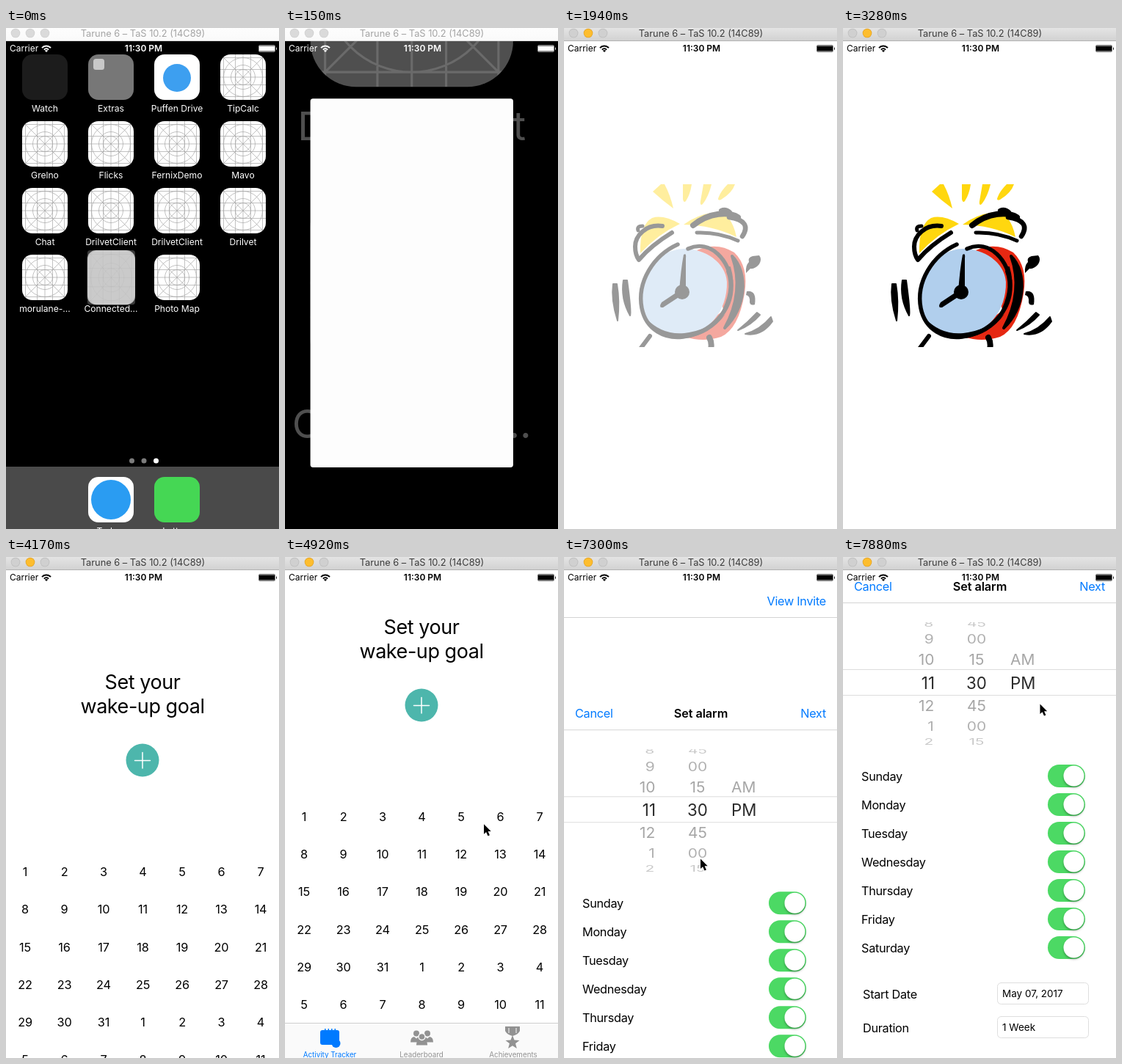
Animation, 372 px wide and 683 px high, one loop 8 s. Source, as an HTML page with a canvas:

```html
<!DOCTYPE html>
<html lang="en">
<head>
<meta charset="utf-8">
<title>Alarm app walkthrough</title>
<style>
  html, body { margin: 0; width: 100%; height: 100%; overflow: hidden; background: #fff; }
  canvas { display: block; width: 372px; height: 683px; }
</style>
</head>
<body>
<canvas id="stage"></canvas>
<script>
const W = 372, H = 683, LOOP = 8000, TOP = 18, TRAVEL = 667;
const BLUE = '#007aff', TEAL = '#4db6ac', GREY = '#929292';
const ratio = Math.max(1, window.devicePixelRatio || 1);

function prepare(canvas) {
  canvas.width = W * ratio;
  canvas.height = H * ratio;
  const c = canvas.getContext('2d');
  c.scale(ratio, ratio);
  return c;
}
let g = prepare(document.getElementById('stage'));

// The picture only changes at these moments and holds in between.
const run = (a, b, n) => Array.from({ length: n }, (_, i) => a + (b - a) * i / (n - 1));
const STEPS = [0, ...run(150, 450, 3), ...run(1940, 2230, 3), ...run(4020, 4470, 4),
  ...run(4770, 5660, 7), 5960, ...run(6260, 7300, 8), ...run(7440, 7880, 4)];
const hold = t => STEPS.filter(s => s <= t + 0.01).pop();

const clamp = v => Math.min(1, Math.max(0, v));
const lerp = (a, b, p) => a + (b - a) * p;
const ramp = (t, a, b) => clamp((t - a) / (b - a));
const ease = p => p * p * (3 - 2 * p);
// Critically damped spring: distance still to go, 1 to 0.
function remaining(t, start) {
  const x = 0.015 * Math.max(0, t - start);
  return x > 7.5 ? 0 : (1 + x) * Math.exp(-x);
}

// ---------- drawing helpers ----------
function box(x, y, w, h, fill) { g.fillStyle = fill; g.fillRect(x, y, w, h); }

function round(x, y, w, h, r, fill, line) {
  g.beginPath();
  g.roundRect(x, y, w, h, r);
  if (fill) { g.fillStyle = fill; g.fill(); }
  if (line) { g.strokeStyle = line; g.lineWidth = 1; g.stroke(); }
}

function disc(x, y, r, fill) {
  g.beginPath();
  g.arc(x, y, r, 0, Math.PI * 2);
  g.fillStyle = fill;
  g.fill();
}

// y is the middle of the capital letters
function text(s, x, y, size, { color = '#000', align = 'center', weight = 400, track = 0 } = {}) {
  g.font = `${weight} ${size}px Inter, "Open Sans", sans-serif`;
  g.letterSpacing = track + 'px';
  g.textAlign = align;
  g.textBaseline = 'alphabetic';
  g.fillStyle = color;
  g.fillText(s, x, y + size * 0.36);
}
const body = (s, x, y, opt) => text(s, x, y, 16.3, { track: -0.3, align: 'left', ...opt });
const headline = (s, y) => text(s, 186, y, 27, { track: -0.45 });

function path(d, fill, line, width) {
  const p = new Path2D(d);
  if (fill) { g.fillStyle = fill; g.fill(p); }
  if (line) {
    g.strokeStyle = line;
    g.lineWidth = width;
    g.lineCap = g.lineJoin = 'round';
    g.stroke(p);
  }
}

// ---------- window frame ----------
function titleBar(active) {
  const shade = g.createLinearGradient(0, 0, 0, 17);
  shade.addColorStop(0, active ? '#e4e4e4' : '#fdfdfd');
  shade.addColorStop(1, active ? '#d2d2d2' : '#fafafa');
  box(0, 0, W, 17, shade);
  box(0, 17, W, 1, active ? '#b2b2b2' : '#d6d6d6');
  [13, 33, 53].forEach((x, i) => {
    const lit = active && i === 1;
    disc(x, 7, 6.3, lit ? '#e0a229' : active ? '#bcbcbc' : '#cfcfcf');
    disc(x, 7, 5.6, lit ? '#fdbd2e' : active ? '#d0d0d0' : '#dadada');
  });
  text('Tarune 6 – TaS 10.2 (14C89)', 186.5, 7, 12.8, { color: active ? '#3c3c3c' : '#a4a4a4' });
}

function statusBar(color) {
  text('Carrier', 5, 28, 12, { color, align: 'left' });
  text('11:30 PM', 187.5, 28, 12, { color, weight: 600 });
  g.strokeStyle = color;
  g.lineCap = 'butt';
  [4.2, 8].forEach(r => {
    g.lineWidth = 1.9;
    g.beginPath();
    g.arc(55, 32.5, r, -Math.PI * 0.77, -Math.PI * 0.23);
    g.stroke();
  });
  path('M55 33L52.8 30.7Q55 29.2 57.2 30.7Z', color);
  g.save();
  g.globalAlpha *= 0.55;
  round(344.5, 23.5, 22, 9, 1.5, null, color);
  g.restore();
  box(345, 24.5, 21, 7, color);
  path('M368 26Q370 28 368 30.5Z', color);
}

// ---------- home screen ----------
const ICON = 62;
const APPS = ['Watch', 'Extras', 'Puffen Drive', 'TipCalc', 'Grelno', 'Flicks', 'FernixDemo', 'Mavo',
  'Chat', 'DrilvetClient', 'DrilvetClient', 'Drilvet', 'morulane-…', 'Connected…', 'Photo Map'];

function blankIcon(x, y) {
  const c = ICON / 2;
  g.save();
  g.translate(x, y);
  round(0, 0, ICON, ICON, 14, '#fff');
  g.clip();
  g.strokeStyle = '#a6a6a6';
  g.lineWidth = 0.7;
  g.beginPath();
  for (const d of [-26.5, -10.5, 0, 10.5, 26.5]) {
    g.moveTo(c + d, 0); g.lineTo(c + d, ICON);
    g.moveTo(0, c + d); g.lineTo(ICON, c + d);
  }
  g.moveTo(0, 0); g.lineTo(ICON, ICON);
  g.moveTo(ICON, 0); g.lineTo(0, ICON);
  for (const r of [10.5, 16.5, 26.5]) {
    g.moveTo(c + r, c);
    g.arc(c, c, r, 0, Math.PI * 2);
  }
  g.stroke();
  g.restore();
}

function home() {
  APPS.forEach((name, i) => {
    const x = 22 + 90 * (i % 4), y = 36 + 91 * Math.floor(i / 4);
    if (i === 0) round(x, y, ICON, ICON, 14, '#1c1c1c');
    else if (i === 1) {
      round(x, y, ICON, ICON, 14, '#777');
      round(x + 7, y + 6, 15, 15, 3.5, '#c8c8c8');
    } else if (i === 2) {
      round(x, y, ICON, ICON, 14, '#fff');
      disc(x + 31, y + 32, 19, '#3d9ff0');
    } else blankIcon(x, y);
    text(name, x + 31, y + 74, 12.1, { color: '#fff' });
  });
  [171.5, 188, 204.5].forEach((x, i) => disc(x, 590, 3.5, i < 2 ? '#7c7c7c' : '#fff'));
  box(0, 598, W, 90, '#4a4a4a');
  round(112, 612, ICON, ICON, 14, '#fff');
  disc(143, 643, 27, '#2a9cf2');
  round(202, 612, ICON, ICON, 14, '#45d754');
  text('Treken', 143, 686, 12.1, { color: '#fff' });
  text('Letters', 233, 686, 12.1, { color: '#fff' });
}

// The tapped icon grows into the empty first screen, a little faster in height.
function launch(t) {
  const p = 1 - remaining(t, -10), q = p ** 0.85;
  const x = lerp(112, 0, p), w = lerp(ICON, W, p);
  const y = lerp(309, TOP, q), h = lerp(ICON, H - TOP, q);
  box(0, TOP, W, H, '#000');
  g.save();
  if (t > 0) {
    g.globalAlpha = 1 - p;
    g.translate(x + w / 2, y + h / 2);
    g.scale(w / ICON, w / ICON);
    g.translate(-143, -340);
  }
  home();
  g.restore();
  statusBar('#fff');
  const tone = Math.round(lerp(188, 255, clamp(p * 1.4)));
  if (t === 0) round(x, y, w, h, 4, '#3a3a3a');
  round(x, y, w, h, lerp(12, 0, p), `rgb(${tone},${tone},${tone})`);
  g.save();
  g.globalAlpha = 0.2 * clamp(1 - 2 * p);
  g.translate(x, y);
  g.scale(w / ICON, h / ICON);
  blankIcon(0, 0);
  g.restore();
}

// ---------- splash illustration ----------
function paintClock() {
  const ink = '#000', sun = '#ffd70f';
  g.beginPath();
  g.rect(0, 213, W, 222);
  g.clip();
  // rays
  path('M121 223L132 213H137Q145 228 149 246Q134 235 121 223Z', sun);
  path('M162 213H174Q172 227 166 236Q163 239 162 233Z', sun);
  path('M190 213H201Q197 230 189 240Q185 243 186 236Z', sun);
  path('M223 213H233Q229 225 214 234Q208 236 211 230Q214 222 223 213Z', sun);
  // bells
  path('M104 307Q103 268 120 259Q135 254 158 267Q128 281 104 307Z', sun);
  path('M163 268Q180 255 205 251Q228 250 235 285Q203 269 163 268Z', sun);
  // body
  path('M181 303Q208 291 232 306Q252 325 246 362Q238 410 214 421Q189 429 165 421L218 385Z', '#e62812');
  path('M162 301C190 300 220 318 222 346C223 386 196 418 160 420C126 423 104 396 106 362C108 326 132 303 162 301Z', '#b1cfed');
  path('M155 295C122 310 99 346 106 382C112 412 138 424 162 421C200 416 229 386 228 350C227 318 200 287 169 301', null, ink, 5.5);
  path('M112 396Q132 426 165 423Q199 419 220 390Q200 411 164 416Q134 419 112 396Z', ink);
  path('M222 332Q232 358 213 392Q237 362 226 326Z', ink, ink, 2);
  path('M229 311C252 334 248 382 219 409C238 374 240 342 229 311Z', ink, ink, 4);
  // bell outlines
  path('M134 270C112 267 97 283 97 298Q97 309 102 316Q119 296 147 279', null, ink, 6);
  path('M101 276Q99 270 107 270', null, ink, 5);
  path('M176 269C198 251 225 250 237 258', null, ink, 8);
  path('M225 258Q257 263 243 284', null, ink, 6.5);
  path('M214 249Q220 246 226 251', null, ink, 6);
  path('M181 279Q211 278 237 290', null, ink, 5);
  // hands
  path('M157 360Q159 330 163 309Q167 306 166 314L166 360Z', ink);
  path('M161 364L135 381Q128 382 133 374L157 358Z', ink);
  disc(161, 360, 10, ink);
  // winding key, feet and shake marks
  path('M248 334Q247 324 252 319Q250 313 257 311L266 310Q270 315 266 322Q260 329 254 328Z', ink);
  path('M249 359Q263 357 260 377Q254 379 253 374Q254 365 248 364Z', ink);
  path('M117 420L105 436', null, ink, 6);
  path('M198 422Q202 429 200 438', null, ink, 8);
  path('M67 349Q64 371 73 399Q76 372 72 349Z', ink, ink, 2);
  path('M81 344Q77 369 90 392Q92 388 86 344Z', ink, ink, 2);
  path('M263 388Q251 401 237 412Q255 405 267 391Z', ink, ink, 2);
  path('M282 394Q267 412 247 417Q269 421 284 400Z', ink, ink, 2);
}

const clockArt = document.createElement('canvas');
const screen = g;
g = prepare(clockArt);
paintClock();
g = screen;

function splash(t) {
  g.globalAlpha = lerp(0.4, 1, ramp(t, 1940, 2230));
  g.drawImage(clockArt, 0, 0, W, H);
  g.globalAlpha = 1;
}

// ---------- app screens ----------
function plusButton(y) {
  disc(186, y, 22.5, TEAL);
  path(`M175.5 ${y + 0.5}H196.5M186 ${y - 10.5}V${y + 11}`, null, '#fff', 1.5);
}

function person(x, y, s, color) {
  g.save();
  g.translate(x, y);
  g.scale(s, s);
  disc(0, 0, 4, color);
  path('M-8 12Q-8 5 -3 4.5L0 7L3 4.5Q8 5 8 12Z', color);
  g.restore();
}

function people(color) {
  person(179, 649.5, 1, color);
  person(194, 649.5, 1, color);
  disc(186.5, 654, 5.2, '#fafafa');
  person(186.5, 654, 0.95, color);
}

function tabBar(selected) {
  const tint = i => i === selected ? BLUE : GREY;
  box(0, 635, W, 60, '#fafafa');
  box(0, 635, W, 1, '#cfcfcf');
  round(48, 645, 26, 20, 3, tint(0));
  [54, 58.5, 63, 67.5].forEach(x => box(x, 643, 1.5, 3, tint(0)));
  disc(69.5, 663, 6, tint(0));
  people(tint(1));
  path('M300 640H320V646Q318 651 310 653Q302 651 300 646Z', tint(2));
  box(304.5, 642, 1, 7, '#fafafa');
  box(314.5, 642, 1, 7, '#fafafa');
  g.beginPath();
  for (let i = 0; i < 10; i++) {
    const a = i * Math.PI / 5 - Math.PI / 2, r = i % 2 ? 4.3 : 10;
    g.lineTo(310 + r * Math.cos(a), 662 + r * Math.sin(a));
  }
  g.fillStyle = tint(2);
  g.fill();
  ['Activity Tracker', 'Leaderboard', 'Achievements'].forEach((s, i) =>
    text(s, 61 + 125 * i, 678, 9.8, { color: tint(i) }));
}

function tracker(dy) {
  g.save();
  g.translate(0, dy);
  box(0, TOP, W, H, '#fff');
  headline('Set your', 95);
  headline('wake-up goal', 128);
  plusButton(202);
  for (let i = 0; i < 42; i++)
    text(String(i % 31 + 1), 26 + 53.5 * (i % 7), 354 + 51.3 * Math.floor(i / 7), 16.3, { track: -0.2 });
  tabBar(0);
  g.restore();
}

function leaderboard() {
  box(0, TOP, W, H, '#fff');
  body('View Invite', 357, 60, { color: BLUE, align: 'right' });
  box(0, 82, W, 1, '#d4d4d4');
  headline('Start a challenge &', 233);
  headline('invite friends', 266);
  plusButton(407);
  tabBar(1);
}

// Values wrapped around a drum, seen from the front.
function wheel(values, first, x, align) {
  const fades = ['#2b2b2b', '#a6a6a6', '#b0b0b0', '#c9c9c9', '#e6e6e6'];
  values.forEach((s, i) => {
    const k = first + i, a = k * 19 * Math.PI / 180;
    g.save();
    g.translate(x - (align === 'right' ? Math.abs(k) * 0.6 : 0), 171.5 + 96 * Math.sin(a));
    g.scale(k ? 0.94 : 1, Math.cos(a) * (k ? 0.95 : 1));
    text(s, 0, 0, 22.3, { color: fades[Math.abs(k)], align });
    g.restore();
  });
}

function toggle(y) {
  round(279, y - 15.5, 51, 31, 15.5, '#4cd964');
  g.save();
  g.shadowColor = 'rgba(0,0,0,.3)';
  g.shadowBlur = 3 * ratio;
  g.shadowOffsetY = 2 * ratio;
  disc(314.5, y, 14, '#fff');
  g.restore();
}

function field(label, value, y) {
  body(label, 27, y);
  round(210.5, y - 15.5, 124, 29, 5, '#fff', '#dedede');
  text(value, 217, y - 1, 13.5, { align: 'left' });
}

function alarmSheet(dy) {
  g.save();
  g.translate(0, dy);
  box(0, TOP, W, TRAVEL, '#fff');
  body('Cancel', 15, 40, { color: BLUE });
  body('Set alarm', 186.5, 40, { align: 'center', weight: 600, track: -0.1 });
  body('Next', 357, 40, { color: BLUE, align: 'right' });
  box(0, 62, W, 1, '#d4d4d4');
  g.save();
  g.beginPath();
  g.rect(0, 89, W, 168);
  g.clip();
  wheel(['8', '9', '10', '11', '12', '1', '2', '3'], -3, 125, 'right');
  wheel(['45', '00', '15', '30', '45', '00', '15', '30'], -3, 182, 'center');
  wheel(['AM', 'PM'], -1, 228, 'left');
  g.restore();
  box(0, 153, W, 1, '#dcdcdc');
  box(0, 188, W, 1, '#dcdcdc');
  ['Sunday', 'Monday', 'Tuesday', 'Wednesday', 'Thursday', 'Friday', 'Saturday'].forEach((day, i) => {
    body(day, 25, 299 + 39 * i);
    toggle(298.5 + 39 * i);
  });
  field('Start Date', 'May 07, 2017', 596);
  field('Duration', '1 Week', 642);
  g.restore();
}

// ---------- pointer ----------
// start, end, from x, y, to x, y
const MOVES = [
  [4770, 5660, 278, 340, 177, 660],
  [6110, 6850, 177, 660, 185.5, 411],
  [7440, 7880, 185.5, 411, 268, 200]
];

function pointer(t) {
  const move = MOVES.filter(m => t >= m[0]).pop();
  if (!move) return;
  const [a, b, x0, y0, x1, y1] = move, p = ease(ramp(t, a, b));
  g.save();
  g.translate(lerp(x0, x1, p), lerp(y0, y1, p));
  const arrow = 'M0.5 0.5V14L3.6 11.2L6 16.6L8.4 15.6L6.1 10.3H10.2Z';
  path(arrow, null, '#fff', 2);
  path(arrow, '#000');
  g.restore();
}

function draw(t) {
  box(0, 0, W, H, '#fff');
  if (t < 450) launch(t);
  else {
    if (t >= 1940 && t < 4470) splash(t);
    if (t >= 4020 && t < 5960) tracker(TRAVEL * remaining(t, 3920.6));
    if (t >= 5960) leaderboard();
    if (t >= 7140) alarmSheet(TRAVEL * remaining(t, 7124));
    statusBar('#000');
    pointer(t);
  }
  titleBar(t >= 1940);
}

const begin = performance.now();
let shown = -1;
function tick() {
  const t = hold((performance.now() - begin) % LOOP);
  if (t !== shown) draw(shown = t);
  requestAnimationFrame(tick);
}
tick();
</script>
</body>
</html>
```
